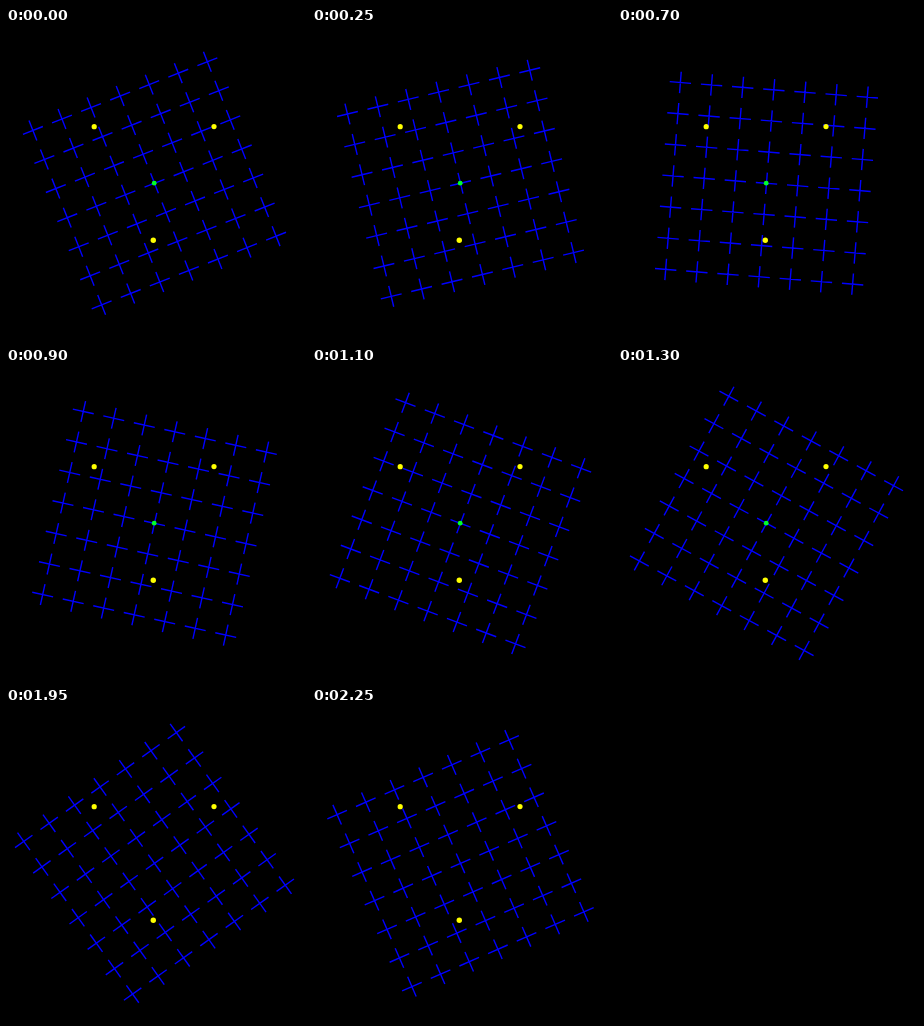
An HTML page with a canvas for the animation above (2300 ms loop, 300 by 312 pixels).

```html
<!DOCTYPE html>
<html lang="en">
<head>
<meta charset="utf-8">
<title>Rotating grid</title>
<style>
  html, body { margin: 0; width: 100%; height: 100%; overflow: hidden; background: #000; }
  canvas { display: block; }
</style>
</head>
<body>
<canvas id="stage" width="300" height="312"></canvas>
<script>
const ctx = document.getElementById('stage').getContext('2d');
const LOOP = 2300, STEP = 50;
const CX = 148.5, CY = 155.3, GAP = 31.25, ARM = 10.7;

function dot(x, y, r, color) {
  ctx.fillStyle = color;
  ctx.beginPath();
  ctx.arc(x, y, r, 0, Math.PI * 2);
  ctx.fill();
}

function grid(degrees) {
  ctx.save();
  ctx.translate(CX, CY);
  ctx.rotate(degrees * Math.PI / 180);
  ctx.strokeStyle = '#00f';
  ctx.lineWidth = 1.4;
  ctx.beginPath();
  for (let row = -3; row <= 3; row++) {
    for (let col = -3; col <= 3; col++) {
      const x = col * GAP, y = row * GAP;
      ctx.moveTo(x - ARM, y);
      ctx.lineTo(x + ARM, y);
      ctx.moveTo(x, y - ARM);
      ctx.lineTo(x, y + ARM);
    }
  }
  ctx.stroke();
  ctx.restore();
}

const start = performance.now();

function draw() {
  const t = (performance.now() - start) % LOOP;
  // The first pose lasts two steps; 45 poses make a quarter turn.
  const pose = Math.max(0, Math.floor(t / STEP) - 1);

  ctx.fillStyle = '#000';
  ctx.fillRect(0, 0, 300, 312);
  grid(-21.5 + 2 * pose);
  if (pose < 34) dot(148.2, 155.2, 2.4, '#00ff2a');
  dot(88.2, 98.7, 2.6, '#ff0');
  dot(208, 98.6, 2.6, '#ff0');
  dot(147.3, 212.2, 2.7, '#ff0');
  requestAnimationFrame(draw);
}
draw();
</script>
</body>
</html>
```
